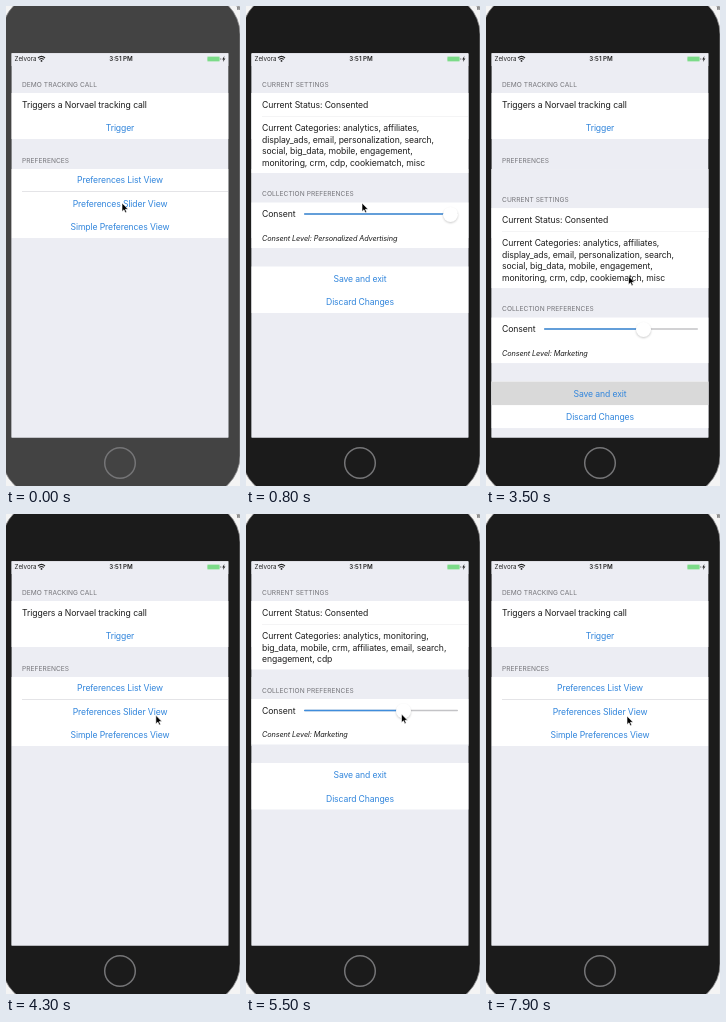
These frames come from a looping animation (234 px wide and 480 px high, 8000 ms). An HTML page:

```html
<!DOCTYPE html>
<html lang="en">
<head>
<meta charset="utf-8">
<title>Consent preferences demo</title>
<style>
  html, body { margin: 0; width: 100%; height: 100%; overflow: hidden; background: #f4f4f4; }
  svg { display: block; width: 234px; height: 480px; }
  text { font-family: Inter, Roboto, sans-serif; }
  .head { font-size: 6.6px; letter-spacing: .06px; fill: #75757a; }
  .row { font-size: 8.65px; letter-spacing: -.009em; fill: #1c1c1c; }
  .link { font-size: 8.65px; letter-spacing: -.014em; fill: #3286dc; text-anchor: middle; }
  .level { font-size: 7.3px; letter-spacing: -.013em; font-style: italic; fill: #1c1c1c; }
  .bar { font-size: 6.2px; fill: #222; }
</style>
</head>
<body>
<svg viewBox="0 0 234 480">
  <defs>
    <clipPath id="screenClip"><rect x="5.6" y="47.2" width="216.7" height="384.4"/></clipPath>
    <filter id="soft" x="-50%" y="-50%" width="200%" height="200%"><feGaussianBlur stdDeviation="1"/></filter>
  </defs>
  <text x="230.5" y="4" font-size="6" fill="#222">w</text>
  <rect id="body" x="-4" y="-12" width="238" height="502" rx="40" stroke="#8a8a8c" stroke-width=".8"/>
  <circle cx="114" cy="457" r="15.3" fill="none" stroke="#757577" stroke-width="1.5"/>

  <g clip-path="url(#screenClip)">
    <rect x="5" y="47" width="218" height="385" fill="#ecedf3"/>
    <g id="menu"></g>
    <g id="sheet">
      <rect x="5" y="48" width="218" height="400" fill="#ecedf3"/>
      <g id="form"></g>
    </g>
    <rect x="5" y="47" width="218" height="13" fill="#ecedf3"/>
    <text class="bar" x="8.6" y="55.3">Zelvora</text>
    <path d="M32 52Q35.5 48.8 39 52M33.4 53.5Q35.5 51.6 37.6 53.5" fill="none" stroke="#222" stroke-width="1.1"/>
    <circle cx="35.5" cy="54.9" r=".9" fill="#222"/>
    <text class="bar" x="115" y="55.3" text-anchor="middle" font-weight="600">3:51 PM</text>
    <rect x="201" y="50.3" width="13" height="5.4" rx="1.3" fill="#b5e6bd"/>
    <rect x="201.7" y="51" width="11.6" height="4" rx=".8" fill="#7bdb88"/>
    <rect x="214.4" y="52.1" width=".8" height="1.8" fill="#888"/>
    <path d="M218.4 50L216.2 53.4H217.5L217 56L219.4 52.5H218Z" fill="#222"/>
  </g>

  <circle id="ring" cx=".5" cy=".5" r="11" fill="none" stroke="#111" stroke-width="1.5"/>
  <path id="cursor" d="M0 0V8.6L2 6.8L3.3 9.7L4.7 9.1L3.4 6.3H6.1Z" fill="#000" stroke="#fff" stroke-width=".6"/>
</svg>

<script>
const LOOP = 8000, STEP = 100, MENU_SHIFT = 184;
const $ = id => document.getElementById(id);

const text = (cls, x, mid, s, drop = 3) => `<text class="${cls}" x="${x}" y="${mid + drop}">${s}</text>`;
const head = (mid, s) => text('head', 16, mid, s, 2.4);
const row = (mid, s) => text('row', 16, mid, s);
const link = (mid, s) => text('link', 114, mid, s);
const band = (top, bottom, fill = '#fff') =>
  `<rect x="5" y="${top}" width="218" height="${bottom - top}" fill="${fill}"/>`;
const rule = (y, fill) => `<rect x="16" y="${y}" width="206" height=".6" fill="${fill}"/>`;

const CATEGORIES = [
  ['Current Categories: analytics, affiliates,', 'display_ads, email, personalization, search,',
   'social, big_data, mobile, engagement,', 'monitoring, crm, cdp, cookiematch, misc'],
  ['Current Categories: analytics, monitoring,', 'big_data, mobile, crm, affiliates, email, search,',
   'engagement, cdp']
];

function menuMarkup(pressed) {
  return head(79, 'DEMO TRACKING CALL') + band(87, 133) +
    row(98.5, 'Triggers a Norvael tracking call') + link(121.5, 'Trigger') +
    head(154.5, 'PREFERENCES') + band(163, 232) +
    (pressed ? band(186, 209, '#d9d9d9') : '') + rule(185, '#d3d3d7') +
    link(174, 'Preferences List View') + link(197.5, 'Preferences Slider View') +
    link(221, 'Simple Preferences View');
}

function sliderMarkup(knob, y) {
  return `<rect x="58" y="${y - .7}" width="154" height="1.4" rx=".7" fill="#c3c3c6"/>
    <rect x="58" y="${y - .7}" width="${knob - 58}" height="1.4" rx=".7" fill="#3f8ddc"/>
    <circle cx="${knob}" cy="${y + 1.6}" r="7.3" fill="#000" opacity=".22" filter="url(#soft)"/>
    <circle cx="${knob}" cy="${y + .4}" r="7.5" fill="#fff"/>`;
}

function formMarkup(lines, knob, level, pressed) {
  const d = (lines.length - 4) * 11.5;   // rows below move with the number of lines
  return head(79, 'CURRENT SETTINGS') + band(87, 167 + d) +
    row(99, 'Current Status: Consented') + rule(110.3, '#ececee') +
    lines.map((s, i) => row(122 + i * 11.5, s)).join('') +
    head(188 + d, 'COLLECTION PREFERENCES') + band(196.5 + d, 242 + d) +
    row(208 + d, 'Consent') + sliderMarkup(knob, 208 + d) +
    text('level', 16, 232 + d, 'Consent Level: ' + level, 2.5) +
    band(260.5 + d, 307 + d) + (pressed ? band(260.5 + d, 284 + d, '#d9d9d9') : '') +
    link(272.5 + d, 'Save and exit') + link(296 + d, 'Discard Changes');
}

const clamp = v => Math.max(0, Math.min(1, v));
const ease = p => p < .5 ? 4 * p ** 3 : 1 - (2 - 2 * p) ** 3 / 2;
const within = (t, spans) => spans.some(([a, b]) => t >= a && t < b);

// time, x, y of the pointer tip
const POINTER = [
  [0, 116, 197], [800, 116, 197], [1300, 205, 208], [1800, 163.3, 210], [2200, 163.3, 210],
  [2900, 142.5, 270], [3800, 142.5, 270], [4400, 150, 200], [4800, 154, 217],
  [5300, 155.5, 200], [5600, 155.5, 200], [6000, 114, 190], [6100, 114, 190],
  [6400, 128, 261], [7100, 128, 261], [7800, 141, 202], [8000, 141, 202]
];
const CLICKS = [[100, 200], [1200, 2100], [3300, 3400], [4400, 4500], [6600, 6700]];
// start, duration, shift before, shift after
const SLIDES = [
  [180, 505, MENU_SHIFT, 0], [3268, 425, 0, MENU_SHIFT],
  [4497, 505, MENU_SHIFT, 0], [6568, 425, 0, MENU_SHIFT]
];

function pointerAt(t) {
  const i = Math.max(1, POINTER.findIndex(k => k[0] > t));
  const [a, ax, ay] = POINTER[i - 1], [b, bx, by] = POINTER[i];
  const p = ease((t - a) / (b - a));
  return [ax + (bx - ax) * p, ay + (by - ay) * p];
}

function shiftAt(t) {
  const [start, span, from, to] = SLIDES.filter(s => s[0] <= t).pop() || SLIDES[0];
  return from + (to - from) * ease(clamp((t - start) / span));
}

function render(t) {
  const shift = shiftAt(t), [x, y] = pointerAt(t);
  const knob = 204.5 - 47 * ease(clamp((t - 1300) / 500));

  $('menu').innerHTML = menuMarkup(within(t, [[100, 700], [4400, 5000]]));
  $('form').innerHTML = formMarkup(CATEGORIES[t < 3900 ? 0 : 1], knob,
    t < 1600 ? 'Personalized Advertising' : 'Marketing', within(t, [[3300, 3800], [6600, 7100]]));
  $('sheet').setAttribute('transform', `translate(0 ${shift})`);
  $('form').setAttribute('opacity', clamp((MENU_SHIFT - shift) / 55));

  $('cursor').setAttribute('transform', `translate(${x} ${y})`);
  $('ring').setAttribute('transform', `translate(${x} ${y})`);
  $('ring').setAttribute('visibility', within(t, CLICKS) ? 'visible' : 'hidden');
  $('body').setAttribute('fill', t < 100 ? '#434343' : '#1b1b1b');
}

const begin = performance.now();
let shown = -1;
function tick() {
  const t = Math.floor((performance.now() - begin) % LOOP / STEP) * STEP;
  if (t !== shown) render(shown = t);
  requestAnimationFrame(tick);
}
tick();
</script>
</body>
</html>
```
